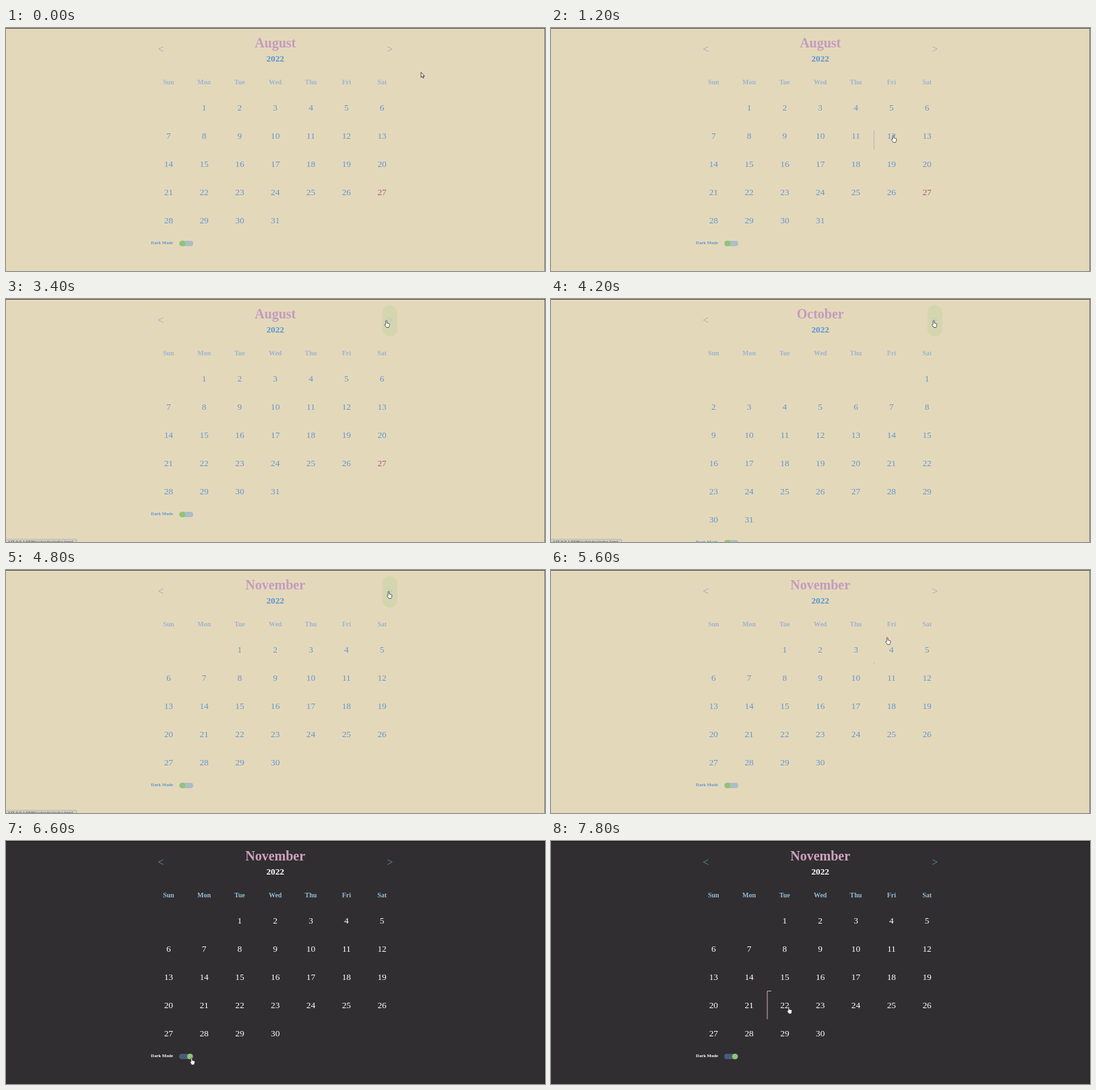
Animation, 800 px wide and 362 px high, one loop 8 s. Source, as an HTML page:

```html
<!DOCTYPE html>
<html lang="en">
<head>
<meta charset="utf-8">
<title>Calendar</title>
<style>
  html, body { margin: 0; width: 100%; height: 100%; overflow: hidden; }
  svg {
    display: block; width: 100%; height: 100%;
    font-family: "Liberation Serif", "Times New Roman", serif;
    --bg: #e4d8bb; --top: #4b4945; --side: #817d74; --title: #c49bbe; --year: #5997cf;
    --week: #9cb5cf; --day: #6099cd; --arrow: #a79dc4; --track: #abbfc5; --line: #c9a6ba;
  }
  svg.dark {
    --bg: #302e30; --top: #1b1a1b; --side: #232223; --title: #cfa3bf; --year: #fff;
    --week: #93bbd8; --day: #fff; --arrow: #5c9b9d; --track: #4a5b7b; --line: #d3abbf;
  }
  text { text-anchor: middle; }
  .bold { font-weight: bold; }
</style>
</head>
<body>
<svg id="stage" viewBox="0 0 800 362" preserveAspectRatio="none"></svg>
<script>
const LOOP = 8000, STEP = 200;
const COL = 52.8, ROW = 42, LEFT = 214.9, TOP = 98;
const DRAW_SPEED = 0.16; // px of cell border per ms
const FIRST_CLICK = 3800, CLICK_GAP = 400, CLICKS = 3;
const DARK_AT = 6600;
const AUGUST = 7;

// Each pointer move eases along a curve from where the last one stopped
const HOME = [616, 66];
const MOVES = [
  { from: 200, to: 1200, bend: [650, 80], end: [508, 160] },
  { from: 1400, to: 2200, bend: [530, 204], end: [555, 248] },
  { from: 2400, to: 3400, bend: [670, 150], end: [564.5, 32] },
  { from: 3400, to: 3600, bend: [566, 32], end: [568, 32] },
  { from: 5200, to: 6400, bend: [440, 160], end: [275.5, 323] },
  { from: 6900, to: 7900, bend: [300, 265], end: [356, 246] }
];

const stage = document.getElementById('stage');

function add(tag, attrs, content = '', parent = stage) {
  const el = document.createElementNS('http://www.w3.org/2000/svg', tag);
  for (const key in attrs) el.setAttribute(key, attrs[key]);
  el.textContent = content;
  return parent.appendChild(el);
}

function label(x, y, size, color, content, bold = false, parent = stage) {
  return add('text', {
    x, y, 'font-size': size, class: bold ? 'bold' : '', style: `fill:${color}`
  }, content, parent);
}

const show = (el, on) => el.setAttribute('display', on ? 'inline' : 'none');
const clamp = (v, lo, hi) => Math.min(hi, Math.max(lo, v));
const midX = col => LEFT + (col + 0.5) * COL;

add('rect', { width: 800, height: 362, style: 'fill:var(--bg)' });
add('rect', { x: 799, width: 1, height: 362, style: 'fill:var(--side)' });
add('rect', { width: 800, height: 1, style: 'fill:var(--top)' });

const pill = add('rect', { x: 558.5, y: 9, width: 22.5, height: 47, rx: 11, fill: '#d5d6af' });
const title = label(399.7, 29, 20, 'var(--title)', '', true);
label(399.7, 50, 13.3, 'var(--year)', '2022', true);
label(229.7, 37, 16, 'var(--arrow)', '<');
const next = label(569.7, 37, 16, 'var(--arrow)', '>');
['Sun', 'Mon', 'Tue', 'Wed', 'Thu', 'Fri', 'Sat'].forEach((name, col) =>
  label(midX(col), 84, 10, 'var(--week)', name, true));

const days = Array.from({ length: 42 }, (_, i) =>
  label(midX(i % 7), TOP + 25.4 + Math.floor(i / 7) * ROW, 13.3, 'var(--day)', ''));
const border = add('path', { fill: 'none', style: 'stroke:var(--line)' });

const footer = add('g', {});
label(231.5, 322, 6.7, 'var(--year)', 'Dark Mode', true, footer);
add('rect', { x: 257, y: 317, width: 21, height: 8, rx: 4, style: 'fill:var(--track)' }, '', footer);
const knob = add('circle', { cy: 321, r: 4.2, fill: '#92c56f' }, '', footer);

const status = add('g', {});
add('rect', { x: -1, y: 358, width: 106, height: 6, rx: 1, fill: '#d0cdc2', stroke: '#aaa79d', 'stroke-width': 0.6 }, '', status);
label(51, 364, 6.8, '#333', '127.0.0.1:5500/calendar/index.html', false, status);

const pointer = add('g', { fill: '#fff', stroke: '#222', 'stroke-width': 0.8, 'stroke-linejoin': 'round' });
const arrow = add('path', { d: 'M0 0V7.6L1.8 6 3 8.6 4.1 8.1 3 5.6H5.3z' }, '', pointer);
const hand = add('path', {
  d: 'M-1 6.5V.8a1 1 0 0 1 2 0V4.3l3.2.6q1.2.3 1.2 1.5L4.8 9.5 4 11.6H.2L-2.6 7.6q-.3-1.2.6-1.2z',
  transform: 'scale(.9)'
}, '', pointer);

function pointerAt(t) {
  let pos = HOME;
  for (const { from, to, bend, end } of MOVES) {
    if (t <= from) break;
    const u = clamp((t - from) / (to - from), 0, 1);
    const k = u * u * (3 - 2 * u);
    pos = pos.map((p, i) => p * (1 - k) ** 2 + 2 * bend[i] * k * (1 - k) + end[i] * k * k);
  }
  return pos;
}

const monthAt = t => AUGUST + clamp(Math.floor((t - FIRST_CLICK) / CLICK_GAP) + 1, 0, CLICKS);

function dayIn(month, cell) {
  const day = cell - new Date(2022, month, 1).getDay() + 1;
  return day > 0 && day <= new Date(2022, month + 1, 0).getDate() ? day : 0;
}

function cellAt(t) {
  const [x, y] = pointerAt(t);
  const col = Math.floor((x - LEFT) / COL), row = Math.floor((y - TOP) / ROW);
  if (col < 0 || col > 6 || row < 0 || row > 5) return -1;
  const cell = row * 7 + col;
  return dayIn(monthAt(t), cell) ? cell : -1;
}

// The border runs up the left side, then along the top, right and bottom
function drawBorder(t, cell) {
  show(border, cell >= 0);
  if (cell < 0) return;
  let since = 0;
  while (since < t && cellAt(t - since) === cell) since += 5;
  const x = LEFT + (cell % 7) * COL + 0.5, y = TOP + Math.floor(cell / 7) * ROW - 0.5;
  border.setAttribute('d', `M${x} ${y + ROW}V${y}H${x + COL - 1}V${y + ROW}H${x}`);
  border.setAttribute('stroke-dasharray', `${since * DRAW_SPEED} 400`);
}

function render(t) {
  const month = monthAt(t);
  const dark = t >= DARK_AT;
  const [x, y] = pointerAt(t);
  const cell = cellAt(t);
  const onNext = x > 558 && x < 581 && y > 9 && y < 56;
  const onToggle = x > 257 && x < 279 && y > 316 && y < 326;

  stage.classList.toggle('dark', dark);
  title.textContent = new Date(2022, month, 1).toLocaleString('en', { month: 'long' });
  days.forEach((el, i) => {
    const day = dayIn(month, i);
    el.textContent = day || '';
    el.style.fill = month === AUGUST && day === 27 ? '#a75a86' : 'var(--day)';
  });
  footer.setAttribute('transform', `translate(0 ${dayIn(month, 35) ? ROW : 0})`);
  knob.setAttribute('cx', dark ? 273 : 262);

  show(pill, onNext);
  show(status, onNext);
  next.style.fill = onNext ? '#9fcbcb' : 'var(--arrow)';
  drawBorder(t, cell);

  const clickable = cell >= 0 || onNext || onToggle;
  show(hand, clickable);
  show(arrow, !clickable);
  pointer.setAttribute('transform', `translate(${x} ${y})`);
}

const start = performance.now();
function tick() {
  const t = (performance.now() - start) % LOOP;
  render(Math.floor(t / STEP) * STEP);
  requestAnimationFrame(tick);
}
tick();
</script>
</body>
</html>
```
